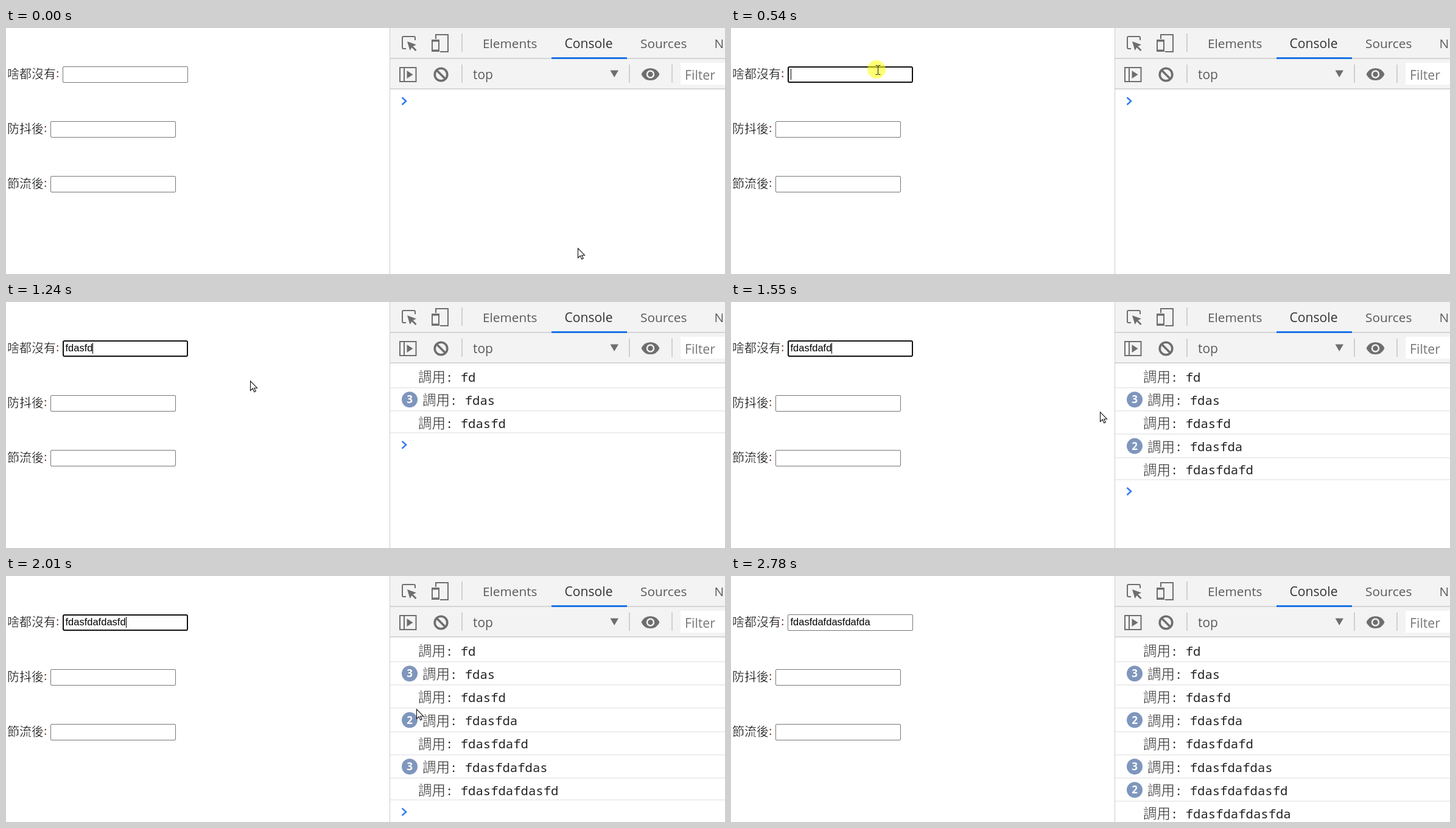
Animation, 1181 px wide and 404 px high, one loop 2.93 s. Source, as an HTML page:

```html
<!DOCTYPE html>
<html lang="zh-Hant">
<head>
<meta charset="utf-8">
<title>Debounce and throttle console</title>
<style>
  html, body { margin: 0; width: 100%; height: 100%; overflow: hidden; background: #fff; }
  svg { display: block; width: 1181px; height: 404px; }
  text { white-space: pre; }
  /* The white outline thins the strokes of the regular weight. */
  .cjk { font-family: "Noto Sans CJK TC", "Noto Sans CJK JP", "Noto Sans CJK SC", sans-serif;
    font-weight: 300; stroke: #fff; stroke-width: .45px; }
  .label { font-size: 20px; }
  .colon { font: 20px "Liberation Serif", serif; fill: #6a3426; }
  .ui { font-family: "Open Sans", "Noto Sans", sans-serif; font-size: 20.8px; fill: #5a5a5a; }
  .typed { font: 16.5px "Liberation Sans", sans-serif; }
  .log { font-size: 22.5px; fill: #333; }
  .mono { font: 20.6px "Noto Sans Mono", monospace; fill: #222; }
  .count { font: bold 17px "Open Sans", "Noto Sans", sans-serif; fill: #fff; text-anchor: middle; }
</style>
</head>
<body>
<svg viewBox="0 0 1181 404">
  <g id="form"></g>

  <rect x="630" width="1" height="404" fill="#ccc"/>
  <rect x="631" width="550" height="100" fill="#f3f3f3"/>
  <path d="M631 50H1181M631 100H1181" stroke="#ccc" stroke-width="1.6"/>
  <path d="M749 9V39M749 60V90M1024 60V90M1094 60V90" stroke="#ccc" stroke-width="1.8"/>
  <rect x="896" y="48" width="124" height="3" fill="#1a73e8"/>
  <rect x="1108" y="57" width="73" height="36" fill="#fff"/>

  <g class="ui">
    <text x="783" y="33">Elements</text>
    <text x="917.500" y="33" style="font-size:21.1px;fill:#333">Console</text>
    <text x="1042" y="33">Sources</text>
    <text x="1163.500" y="33">N</text>
    <text x="767" y="84" style="font-size:21px">top</text>
    <text x="1115" y="85" style="font-size:21.3px;fill:#777">Filter</text>
  </g>

  <g fill="none" stroke="#6e6e6e" stroke-width="2">
    <path d="M657 34H653Q651 34 651 32V16Q651 14 653 14H670Q672 14 672 16V20"/>
    <path d="M659 22L674 27.500L668.500 30L674.500 36L672.500 38L666.500 32L663.500 37Z" fill="#6e6e6e" stroke="none"/>
    <path d="M706 18V11H726V39H713"/>
    <rect x="700" y="20" width="11" height="18"/>
    <path d="M700 21H711M700 37H711" stroke-width="3"/>
    <path d="M647 65H673.500V88H647ZM654 65V88"/>
    <path d="M658.500 70V83L668.500 76.500Z" fill="#6e6e6e" stroke="none"/>
    <circle cx="714.500" cy="76.500" r="10.300" stroke-width="3.600"/>
    <path d="M707.500 69.500L721.500 83.500" stroke-width="3.600"/>
  </g>
  <path d="M992.500 69.500H1006L999.200 81Z" fill="#6e6e6e"/>
  <path d="M1043.500 76Q1048 66 1058.500 66T1073.500 76Q1069 86 1058.500 86T1043.500 76Z" fill="#6e6e6e"/>
  <circle cx="1058.500" cy="76" r="5.500" fill="#6e6e6e" stroke="#f3f3f3" stroke-width="2.500"/>

  <g id="console"></g>
  <g id="pointer"></g>
</svg>

<script>
const LOOP = 2930;
const STEP = 77.1;              // the screen refreshes once per step
const CLICK = 7, BLUR = 36;     // in steps
const ROW = 38.2;

// Keys arrive in short bursts at a steady beat; each burst is logged a little later.
const BURST_START = 744, BURST_GAP = 181, LOG_DELAY = 73, REPEAT_GAP = 110;
let prefix = '';
const bursts = 'fd as*3 fd a*2 fd as*3 fd*2 a fda'.split(' ').map((entry, i) => {
  const [keys, calls = 1] = entry.split('*');
  return { value: prefix += keys, calls: +calls, time: BURST_START + i * BURST_GAP };
});

// Turning points of the pointer: [step, x, y]
const path = [[0, 939, 361], [5, 241, 69], [8, 241, 69], [10, 241, 76], [13, 241, 76],
  [16, 401, 129], [20, 606, 180], [26, 674, 218], [30, 1041, 363], [32, 1177, 405]];

const byId = id => document.getElementById(id);

function pointerAt(step) {
  const next = path.findIndex(point => point[0] > step);
  if (next < 0) return path[path.length - 1].slice(1);
  const [s0, x0, y0] = path[next - 1], [s1, x1, y1] = path[next];
  const k = (step - s0) / (s1 - s0);
  return [Math.round(x0 + (x1 - x0) * k), Math.round(y0 + (y1 - y0) * k)];
}

function field(label, y, focused) {
  const end = 2 + label.length * 20, x = end + 11;
  const box = focused
    ? `<rect x="${x + 1}" y="${y + 1}" width="204" height="25" rx="2" fill="#fff" stroke="#101010" stroke-width="2"/>`
    : `<rect x="${x + .5}" y="${y + .5}" width="205" height="26" rx="1.5" fill="#fff" stroke="#767676"/>`;
  return `<text class="cjk label" x="2" y="${y + 20}">${label}</text>
    <text class="colon" x="${end}" y="${y + 18}">:</text>${box}`;
}

function renderForm(step) {
  const focused = step >= CLICK && step < BLUR;
  const typed = bursts.filter(burst => burst.time <= step * STEP).pop();
  const value = typed ? typed.value : '';
  byId('form').innerHTML = field('啥都沒有', 63, focused) +
    field('防抖後', 153) + field('節流後', 243) +
    `<text id="value" class="typed" x="97.5" y="81">${value}</text>`;
  if (focused) {
    const caret = Math.round(98 + (value ? byId('value').getComputedTextLength() - .5 : 0));
    byId('form').innerHTML += `<rect x="${caret}" y="67" width="1" height="18"/>`;
  }
}

function logRow({ value, calls, time }, i, t, last) {
  const count = Math.min(calls, 1 + Math.floor((t - time - LOG_DELAY) / REPEAT_GAP));
  const y = 131 + i * ROW, x = count > 1 ? 684 : 677;
  const badge = count > 1
    ? `<circle cx="663" cy="${y - 9}" r="13" fill="#7f96bd"/><text class="count" x="663" y="${y - 3}">${count}</text>`
    : '';
  return `${badge}<text class="cjk log" x="${x}" y="${y}">調用</text>
    <text class="mono" x="${x + 45}" y="${y - .5}">: ${value}</text>
    <rect x="631" y="${Math.round(140 + i * ROW - (last ? 2 : 0))}" width="550" height="1.5" fill="#e8e8e8"/>`;
}

function renderConsole(t) {
  const rows = bursts.filter(burst => burst.time + LOG_DELAY <= t);
  byId('console').innerHTML =
    rows.map((burst, i) => logRow(burst, i, t, i === rows.length - 1)).join('') +
    `<path d="M650.5 ${114 + rows.length * ROW}l6.500 6l-6.500 6" fill="none" stroke="#367cf1" stroke-width="2.600"/>`;
}

function renderPointer(step) {
  const [x, y] = pointerAt(step);
  const inField = x > 93 && x < 299 && y > 62 && y < 90;
  const click = step === CLICK
    ? '<circle cx="239" cy="68" r="15" fill="#ff0" opacity=".55"/>' : '';
  const shape = inField
    ? '<path d="M-3.500 -7.500H-1L.5 -6.500L2 -7.500H4.500M.5 -6.500V6.500M-3.500 7.500H-1L.5 6.500L2 7.500H4.500" fill="none" stroke="#222"/>'
    : '<path d="M.5 .8V16.500L4.200 13L6.800 18.700L9.200 17.600L6.700 12.200H11.500Z" fill="#fff" stroke="#111" stroke-width="1.100"/>';
  byId('pointer').innerHTML = `${click}<g transform="translate(${x} ${y})">${shape}</g>`;
}

let shown = -1;
function frame() {
  // The small lead keeps rounding from delaying a refresh.
  const step = Math.floor((performance.now() % LOOP + 3) / STEP);
  if (step !== shown) {
    renderForm(step);
    renderConsole(step * STEP);
    renderPointer(step);
    shown = step;
  }
  requestAnimationFrame(frame);
}
frame();
</script>
</body>
</html>
```
